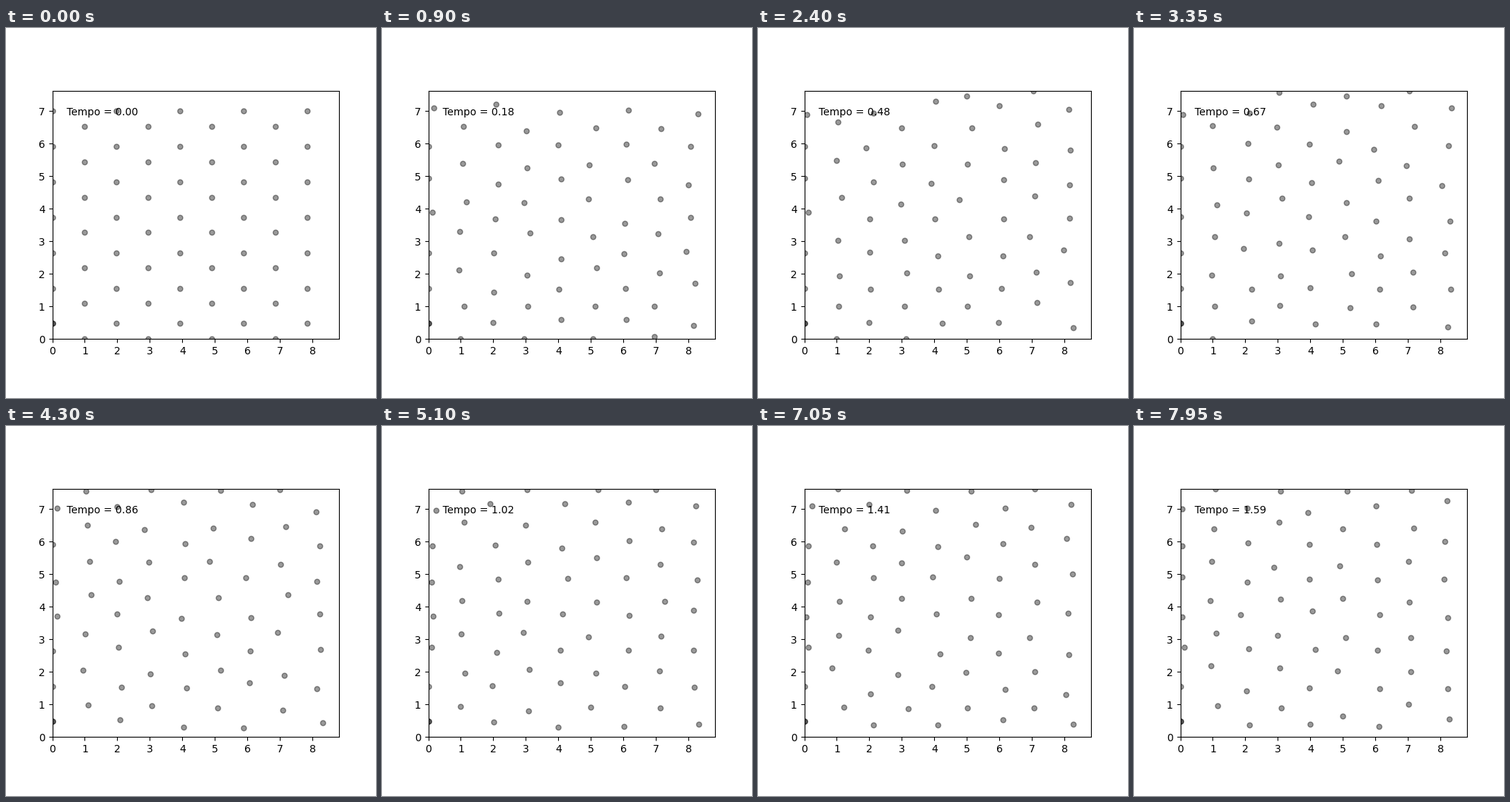
Animation of 500x500 px, one loop 8000 ms. Source, as a matplotlib script:

```python
import numpy as np
import matplotlib.pyplot as plt
from matplotlib.animation import FuncAnimation

FRAMES, INTERVAL = 160, 50
COLS, ROWS = 9, 7
WIDTH = 8.81
HEIGHT = WIDTH * np.sqrt(3) / 2
CORE = 0.92                 # closest approach of two discs
STEP, SPREAD = 0.2, 0.1     # largest trial move, width of each cage

col, row = (g.ravel() for g in np.mgrid[:COLS, :ROWS])
odd = col % 2 == 1
row = row + odd             # odd columns end on the periodic top edge


def lattice():
    x = col * WIDTH / COLS
    y = row * HEIGHT / ROWS + np.where(odd, 0, 0.473)
    return np.stack([x, y], axis=1)


def drift():
    """Mean shift of each disc: spread into the gap on the right, sag in odd columns."""
    dx = 0.09 + 0.25 * (col / (COLS - 1)) ** 3
    dy = np.where(odd, 0.025 * row - 0.2, 0.012 * row - 0.035)
    return np.stack([dx, dy], axis=1)


def mobility():
    """Chance that a disc tries to move in one time step."""
    rate = np.where(row == ROWS, 0.15, 0.5)
    rate[col == 0] = 0.1
    rate[:2] = 0
    return rate


def wrap(p):
    return np.mod(p, [WIDTH, HEIGHT])


def is_free(i, trial, pos):
    gap = np.hypot(*(wrap(pos) - wrap(trial)).T)
    gap[i] = np.inf
    return trial[0] >= 0 and gap.min() >= CORE


def walk():
    """Metropolis walk of hard discs, each held near its drifted site."""
    rng = np.random.default_rng(8)
    pos = lattice()
    home = pos + drift()
    rate = mobility()
    path = [wrap(pos)]
    for _ in range(FRAMES - 1):
        for i in np.flatnonzero(rng.random(len(pos)) < rate):
            trial = pos[i] + rng.uniform(-STEP, STEP, 2)
            cost = ((trial - home[i]) ** 2 - (pos[i] - home[i]) ** 2).sum()
            chance = np.exp(min(0, -cost / (2 * SPREAD ** 2)))
            if rng.random() < chance and is_free(i, trial, pos):
                pos[i] = trial
        path.append(wrap(pos))
    path = np.array(path)
    # the first disc is doubled
    return np.concatenate([path, path[:, :1]], axis=1)


path = walk()

fig, ax = plt.subplots(figsize=(5, 5), dpi=100)
ax.set_aspect("equal")
ax.set_xlim(0, WIDTH)
ax.set_ylim(0, HEIGHT)
ax.set_xticks(range(9))
ax.set_yticks(range(8))
discs, = ax.plot([], [], "ko", ms=5, alpha=0.4)
label = ax.text(0.05, 0.9, "", transform=ax.transAxes)


def draw(n):
    discs.set_data(path[n, :, 0], path[n, :, 1])
    label.set_text(f"Tempo = {n / 100:.2f}")
    return discs, label


anim = FuncAnimation(fig, draw, frames=FRAMES, interval=INTERVAL,
                     init_func=lambda: draw(0), repeat=True, repeat_delay=0)
plt.show()
```
